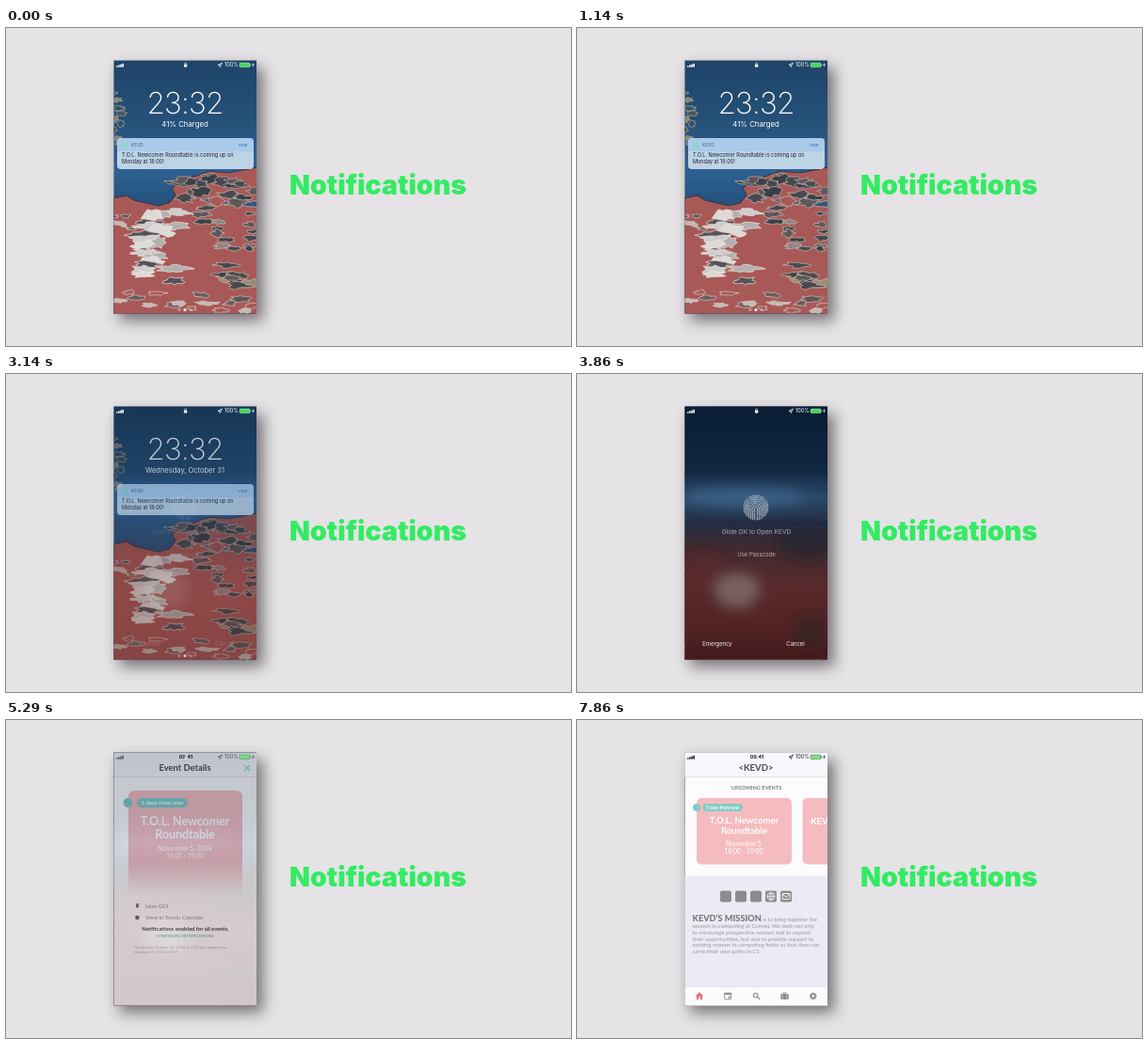
Animation, 600 px wide and 338 px high, one loop 8000 ms. Source, as an HTML page:

```html
<!DOCTYPE html>
<html lang="en">
<head>
<meta charset="utf-8">
<title>Notifications</title>
<style>
  html, body { margin: 0; width: 100%; height: 100%; overflow: hidden; background: #e5e3e5; }
  svg { display: block; width: 100vw; height: 100vh; }
  text { font-family: Inter, "Liberation Sans", sans-serif; white-space: pre; }
  .app text { font-family: Lato, "Open Sans", sans-serif; }
</style>
</head>
<body>
<svg id="stage" viewBox="0 0 600 338"></svg>
<script>
const LOOP = 8000;
const PINK = '#f5bcc0', TEAL = '#80cbc6', GREY = '#8b8b8f';

// Seeded random numbers
let seed = 11;
const rnd = (a = 0, b = 1) => {
  seed = (seed * 16807) % 2147483647;
  return a + (b - a) * seed / 2147483647;
};

const attrs = o => Object.entries(o).map(([k, v]) => `${k}="${v}"`).join(' ');
const rect = (x, y, width, height, fill, more = {}) =>
  `<rect ${attrs({ x, y, width, height, fill, ...more })}/>`;
const dot = (cx, cy, r, fill, more = {}) => `<circle ${attrs({ cx, cy, r, fill, ...more })}/>`;
const line = (d, stroke, width, more = {}) =>
  `<path ${attrs({ d, stroke, 'stroke-width': width, fill: 'none', ...more })}/>`;
const shape = (d, fill, more = {}) => `<path ${attrs({ d, fill, ...more })}/>`;
const label = (x, y, size, str, fill, weight = 400, more = {}) =>
  `<text ${attrs({ x, y, 'font-size': size, fill, 'font-weight': weight, ...more })}>${str}</text>`;
const mid = (x, y, size, str, fill, weight, more = {}) =>
  label(x, y, size, str, fill, weight, { 'text-anchor': 'middle', ...more });

// Ragged, horizontally drawn-out patch
function blob(x, y, w, h, fill, stroke) {
  const n = 16;
  let d = '';
  for (let i = 0; i < n; i++) {
    const a = i / n * Math.PI * 2, k = rnd(0.5, 1.2);
    d += (i ? 'L' : 'M') + (x + Math.cos(a) * w * k).toFixed(1) + ' ' + (y + Math.sin(a) * h * k).toFixed(1);
  }
  return shape(d + 'Z', fill, { stroke, 'stroke-width': 0.7, 'stroke-linejoin': 'round' });
}
// Patches along a band from one point to another, up to (dx, dy) off its axis
function scatter(count, [x0, y0], [x1, y1], dx, dy, w, h, fills, stroke) {
  let out = '';
  for (let i = 0; i < count; i++) {
    const p = (i + 0.5) / count;
    out += blob(x0 + (x1 - x0) * p + rnd(-dx, dx), y0 + (y1 - y0) * p + rnd(-dy, dy),
      rnd(w * 0.5, w), rnd(h * 0.5, h), fills[i % fills.length], stroke);
  }
  return out;
}

function wallpaper() {
  const shore = 'M114 181L128 178 136 183 148 186 162 189 173 186 180 178 176 170 188 161 202 157 216 152 236 154 267 148V304H114Z';
  const white = ['#cfcdcc', '#b3b0b0', '#dedad7', '#55535a'], dark = ['#474850', '#5f5759', '#3b4049'];
  return rect(114, 34, 153, 270, 'url(#sea)')
    + scatter(9, [117, 66], [119, 128], 4, 3, 8, 4, ['#4a5258', '#8a8272', '#31506c'], '#b5aa94')
    + shape(shore, '#a85957', { stroke: '#3b3a44', 'stroke-width': 1.2 })
    + scatter(11, [178, 158], [264, 172], 5, 6, 17, 6, dark, '#b9aea6')
    + scatter(9, [188, 176], [262, 186], 5, 6, 17, 6, [...dark, '#34557c', '#a85957'], '#c9beb6')
    + scatter(9, [202, 190], [240, 240], 9, 4, 13, 5, [...dark, '#8d8583'], '#c9beb6')
    + scatter(6, [255, 196], [262, 240], 5, 4, 9, 4, dark, '#c9beb6')
    + scatter(8, [116, 195], [150, 240], 12, 10, 9, 3, ['#55525a', '#c1b9b5'], '#d0c4bc')
    + scatter(20, [166, 192], [160, 268], 21, 3, 21, 7, white, '#eee6df')
    + scatter(10, [226, 254], [258, 284], 12, 6, 15, 6, [...dark, '#9a8d78'], '#c6b9a5')
    + scatter(14, [116, 286], [264, 294], 6, 8, 13, 4, ['#c4bbb5', '#a85957', '#6b5d60'], '#d6cac4');
}

function blurred() {
  return rect(114, 34, 153, 270, 'url(#dusk)')
    + `<g filter="url(#soft)">`
    + `<ellipse cx="178" cy="131" rx="64" ry="11" fill="#4a7299" opacity=".55"/>`
    + `<ellipse cx="245" cy="180" rx="30" ry="15" fill="#20242e" opacity=".7"/>`
    + `<ellipse cx="170" cy="230" rx="24" ry="19" fill="#8a807b" opacity=".65"/>`
    + `<ellipse cx="247" cy="275" rx="18" ry="16" fill="#2f2325" opacity=".7"/>`
    + `<ellipse cx="136" cy="205" rx="18" ry="18" fill="#6a2528" opacity=".4"/></g>`;
}

function statusBar(ink, green, clock) {
  let bars = '';
  for (let i = 0; i < 4; i++) bars += rect(117 + i * 2.1, 40.2 - i * 0.8, 1.6, 1.4 + i * 0.8, ink);
  const center = clock
    ? mid(191, 41.3, 5.4, '09:41', ink, 700)
    : rect(188.9, 38.7, 3.4, 2.7, ink, { rx: 0.4 }) + line('M189.6 39V37.9a1 1 0 0 1 2 0V39', ink, 0.6);
  return bars + center
    + shape('M229.5 37L225 39.3H227.2V41.5Z', 'none', { stroke: ink, 'stroke-width': 0.7 })
    + label(232, 41.3, 5.5, '100%', ink)
    + rect(248, 37, 11, 4.6, green, { rx: 1, stroke: ink, 'stroke-width': 0.35 })
    + rect(259.5, 38.5, 0.7, 1.7, ink)
    + shape('M263 36.8L261.2 39.6H262.4L261.9 41.7 263.8 38.8H262.6Z', ink);
}

function banner() {
  return rect(118, 117, 145, 33, '#c6daec', { rx: 4, opacity: 0.94 })
    + shape('M118 131V121a4 4 0 0 1 4 -4H259a4 4 0 0 1 4 4V131Z', '#a6c9ea', { opacity: 0.85 })
    + rect(123, 121.3, 6.4, 6.4, '#8fd3cf', { rx: 1.4 })
    + label(133, 126.4, 4.7, 'KEVD', '#4a6177')
    + label(256.5, 126.2, 4.8, 'now', '#2f6fb5', 400, { 'text-anchor': 'end' })
    + label(123, 136.8, 5.5, 'T.O.L. Newcomer Roundtable is coming up on', '#1c2630')
    + label(123, 143.8, 5.5, 'Monday at 18:00!', '#1c2630');
}

function lockContent() {
  return mid(190, 91, 31.6, '23:32', '#fff', 200, { 'letter-spacing': -0.8 })
    + mid(190, 105.3, 7.8, '41% Charged', '#fff', 400, { id: 'charge' })
    + mid(190, 105.3, 7.5, 'Wednesday, October 31', '#fff', 400, { id: 'date' })
    + banner()
    + [184, 190, 196].map((x, i) => dot(x, 299.5, 1.5, '#fff', { opacity: i === 1 ? 0.95 : 0.4 })).join('');
}

function fingerprint() {
  let out = '';
  for (let i = 0; i < 7; i++) {
    const r = 1.3 + i * 1.95, y = 142.5 - i * 0.12;
    out += line(`M${190 - r} 157V${y}A${r} ${r} 0 0 1 ${190 + r} ${y}V157`, '#d5d8dd', 0.85,
      { 'stroke-dasharray': `${9 + i * 3} 1.3 ${5 + i} 1.2`, 'stroke-linecap': 'round' });
  }
  return `<g clip-path="url(#round)">${out}</g>`;
}

function unlockContent() {
  return fingerprint()
    + mid(190.5, 170, 6.6, 'Glide OK to Open KEVD', '#a9abb1')
    + mid(190.5, 194, 6, 'Use Passcode', '#b5b1b4')
    + mid(149, 288.5, 5.9, 'Emergency', '#f2f0f0')
    + mid(232, 288.5, 5.9, 'Cancel', '#f2f0f0');
}

const page = (title, size) => rect(114, 34, 153, 270, '#fdfcfd') + rect(114, 34, 153, 26, '#f8f7fb')
  + rect(114, 60, 153, 0.8, '#e0dee9') + mid(190, 53.6, size, title, '#4a4a4e', 700);

function tag(cx, cy, r, x, w, h, size) {
  return dot(cx, cy, r, TEAL) + rect(x, cy - h / 2, w, h, TEAL, { rx: h / 2 })
    + mid(x + w / 2, cy + size * 0.35, size, '5 days from now', '#fff', 700);
}

function details() {
  return page('Event Details', 9.4)
    + line('M252.8 47.8L259.2 54.2M259.2 47.8L252.8 54.2', '#8fd3d0', 1.1)
    + shape('M130 188V81a6 6 0 0 1 6 -6H245a6 6 0 0 1 6 6V188Z', 'url(#fade)')
    + tag(129.5, 88, 5, 139, 54, 10, 6.1)
    + mid(190, 112, 12.4, 'T.O.L. Newcomer', '#fff', 700)
    + mid(190, 126, 12.4, 'Roundtable', '#fff', 700)
    + mid(190, 139.4, 7, 'November 5, 2018', '#fff', 400)
    + mid(190, 147.4, 6.6, '18:00 - 19:00', '#fff', 400)
    + shape('M137.8 195.2H141.2V196H140.6V198L141.6 199H139.8L139.5 201.5 139.2 199H137.4L138.4 198V196H137.8Z', '#555')
    + label(148, 200, 5.8, 'lakes G01', '#8c8c90')
    + dot(139.4, 210, 2.2, '#66666a')
    + label(148, 212, 5.9, 'View in Tovelu Calendar', '#8c8c90')
    + mid(190.5, 223.6, 5.9, 'Notifications enabled for all events.', '#3f3f43', 700)
    + mid(190, 231.3, 4.5, 'CONFIGURE NOTIFICATIONS', '#62bfa9', 700)
    + label(136, 243, 4.2, 'Created on October 31, 2018 at 3:11, last updated on', '#a9a9ad')
    + label(136, 248, 4.2, 'October 31, 2018 at 3:11', '#a9a9ad');
}

function links() {
  const box = [158, 174, 190, 206, 222].map(x => rect(x - 6, 181.5, 12, 12, GREY, { rx: 2 })).join('');
  return box
    + dot(206, 187.5, 4, 'none', { stroke: '#fff', 'stroke-width': 0.8 })
    + line('M202 187.5H210M206 183.5V191.5M206 183.5Q202.4 187.5 206 191.5Q209.6 187.5 206 183.5', '#fff', 0.6)
    + rect(218, 184.5, 8, 6, 'none', { rx: 0.6, stroke: '#fff', 'stroke-width': 0.9 })
    + line('M218 185L222 188.2 226 185', '#fff', 0.9);
}

function tabs() {
  const teeth = [0, 45, 90, 135].map(a =>
    rect(249.9, 289.6, 1.6, 7.8, GREY, { transform: `rotate(${a} 250.7 293.5)` })).join('');
  return rect(114, 283, 153, 21, '#fbfafd') + rect(114, 283, 153, 0.7, '#dcdae4')
    + shape('M130 289.3L125.7 293.4H127V297.2H129V294.6H131V297.2H133V293.4H134.3Z', '#e5717a')
    + rect(156.7, 290.3, 7, 6.6, 'none', { rx: 0.5, stroke: GREY, 'stroke-width': 0.9 })
    + rect(156.7, 290, 7, 2, GREY) + rect(160.6, 293.7, 2, 2, GREY)
    + dot(189.7, 292.5, 2.3, 'none', { stroke: GREY, 'stroke-width': 1.1 })
    + line('M191.4 294.2L194.2 297', GREY, 1.2)
    + rect(216.3, 291, 8.4, 6, GREY, { rx: 0.7 })
    + line('M219 291V289.8H222V291', GREY, 0.8)
    + line('M218.3 291V297M222.7 291V297', '#fbfafd', 0.4)
    + teeth + dot(250.7, 293.5, 2.9, GREY) + dot(250.7, 293.5, 1.3, '#fbfafd');
}

function home() {
  const mission = ['women in computing at Cornell. We seek not only', 'to encourage prospective women and to expand',
    'their opportunities, but also to provide support to', 'existing women in computing fields so that they can',
    'carve their own paths in CS.'];
  const lead = label(122.5, 214.3, 5.75,
    `<tspan font-size="9.2" font-weight="800" fill="#77777c">KEVD'S MISSION</tspan> is to bring together the`, '#98989d');
  return page('&lt;KEVD&gt;', 9.6)
    + mid(190.5, 73.5, 5.6, 'UPCOMING EVENTS', '#77777b', 700)
    + rect(127, 83, 101, 70.5, PINK, { rx: 5 }) + rect(239.5, 83, 101, 70.5, PINK, { rx: 5 })
    + tag(127, 93, 4, 133.5, 42.5, 8, 4.8)
    + mid(177.5, 110, 9.6, 'T.O.L. Newcomer', '#fff', 700)
    + mid(177.5, 121, 9.6, 'Roundtable', '#fff', 700)
    + mid(177, 134, 7, 'November 5', '#fff') + mid(177, 142, 6.8, '18:00 - 19:00', '#fff')
    + label(248, 111, 9.6, 'KEVD', '#fff', 700)
    + rect(114, 165.5, 153, 118, '#ecebf5')
    + links() + lead
    + mission.map((s, i) => label(122.5, 221.2 + i * 6.7, 5.95, s, '#98989d')).join('')
    + tabs();
}

const stops = list => list.map(([o, c]) => `<stop offset="${o}" stop-color="${c}"/>`).join('');
const gradient = (id, list) => `<linearGradient id="${id}" x2="0" y2="1">${stops(list)}</linearGradient>`;

document.getElementById('stage').innerHTML = `<defs>
  ${gradient('sea', [[0, '#1f4468'], [0.25, '#265179'], [0.42, '#2f6293'], [0.56, '#25527f']])}
  ${gradient('dusk', [[0, '#0a1d35'], [0.25, '#11253f'], [0.36, '#2b4a6c'], [0.46, '#222c42'],
    [0.56, '#41292f'], [0.7, '#572a2c'], [0.88, '#522224'], [1, '#431b1d']])}
  ${gradient('fade', [[0, PINK], [0.66, PINK], [1, '#fdfcfd']])}
  <filter id="soft" x="-30%" y="-30%" width="160%" height="160%"><feGaussianBlur stdDeviation="7"/></filter>
  <filter id="shade" x="-30%" y="-20%" width="160%" height="140%"><feGaussianBlur stdDeviation="8"/></filter>
  <clipPath id="screen"><rect x="114.5" y="34.5" width="151.5" height="269"/></clipPath>
  <clipPath id="round"><circle cx="190" cy="142" r="13.4"/></clipPath></defs>
  ${rect(0, 0, 600, 338, '#e5e3e5')}
  ${rect(120, 42, 153, 269, '#3a363a', { filter: 'url(#shade)', opacity: 0.66 })}
  ${mid(395, 177, 28.5, 'Notifications', '#33eb63', 900)}
  <g clip-path="url(#screen)">
    ${wallpaper()}
    <g id="blur">${blurred()}</g>
    <g id="lock">${lockContent()}</g>
    <g id="unlock">${unlockContent()}</g>
    ${statusBar('#fff', '#3fdc55', false)}
    <g id="app"><g class="app"><g id="home">${home()}</g><g id="details">${details()}</g></g>
      ${statusBar('#222', '#7fe08c', true)}</g>
  </g>`;

const el = id => document.getElementById(id);
const [blur, lock, unlock, app, homeView, sheet, charge, date] =
  ['blur', 'lock', 'unlock', 'app', 'home', 'details', 'charge', 'date'].map(el);
const ramp = (t, a, b) => Math.min(1, Math.max(0, (t - a) / (b - a)));
const ease = p => p * p * (3 - 2 * p);
const fade = (node, v) => {
  node.setAttribute('opacity', v.toFixed(3));
  node.setAttribute('visibility', v > 0 ? 'visible' : 'hidden');
};

function render(t) {
  fade(charge, 1 - ramp(t, 1980, 2240));
  fade(date, ramp(t, 2300, 2560));
  fade(blur, ramp(t, 2960, 3500));
  fade(lock, 1 - ramp(t, 3010, 3520));
  fade(unlock, ramp(t, 3040, 3500) * (1 - ramp(t, 4900, 5150)));
  fade(app, ease(ramp(t, 5050, 5400)));

  const drop = ease(ramp(t, 7120, 7600));
  homeView.setAttribute('display', drop > 0 ? 'inline' : 'none');
  sheet.setAttribute('transform', `translate(0 ${270 * drop})`);
}

const start = performance.now();
function tick() {
  render((performance.now() - start) % LOOP);
  requestAnimationFrame(tick);
}
tick();
</script>
</body>
</html>
```
